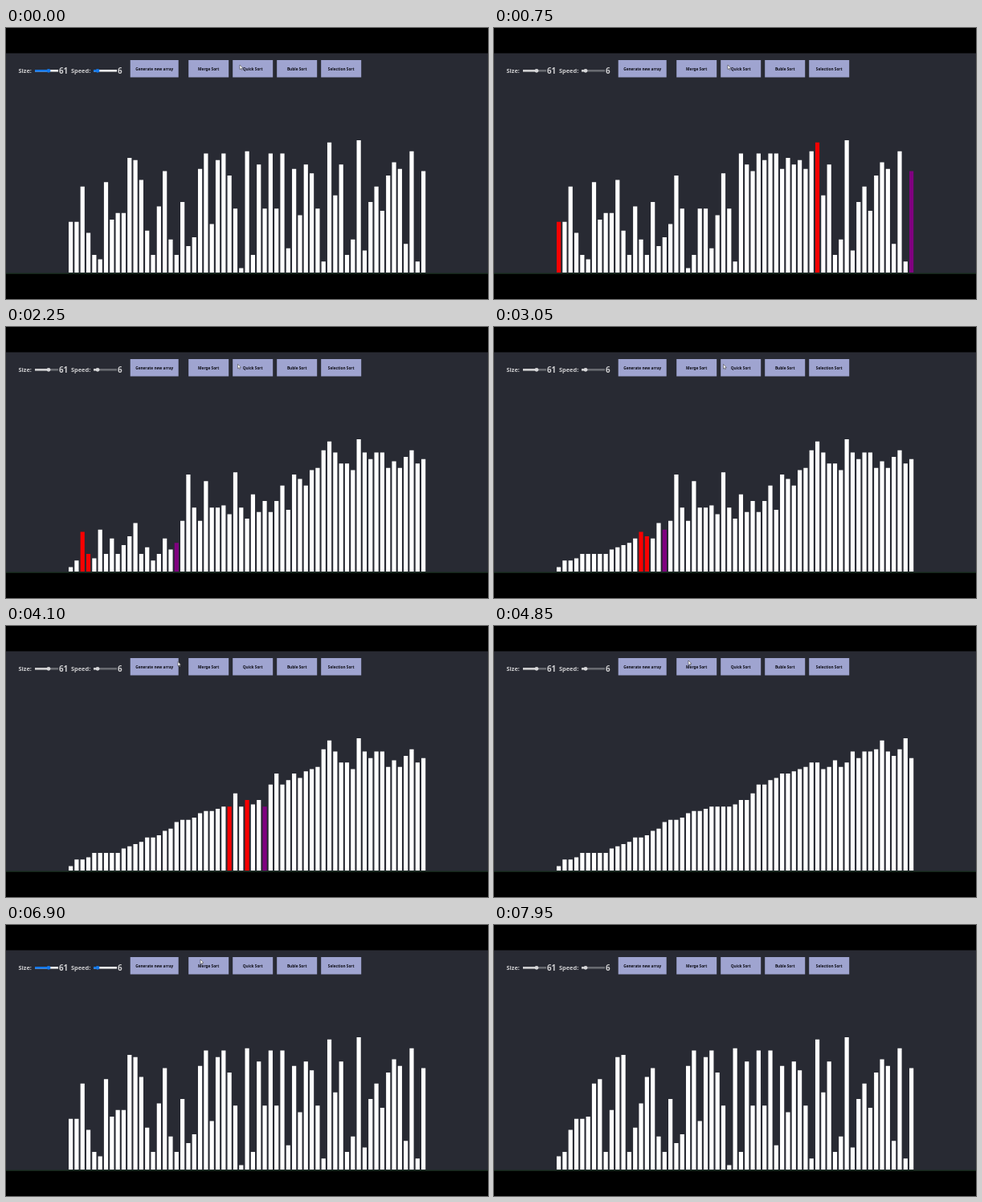
Animation of 600 by 338 pixels, one loop 8 s. Source, as an HTML page with a canvas:

```html
<!DOCTYPE html>
<html lang="en">
<head>
<meta charset="utf-8">
<title>Sorting visualizer</title>
<style>
  html, body { margin: 0; width: 100%; height: 100%; overflow: hidden; background: #000; }
  canvas { display: block; }
</style>
</head>
<body>
<canvas id="stage" width="600" height="338"></canvas>
<script>
const ctx = document.getElementById('stage').getContext('2d');
const LOOP = 8000, TICK = 50;
const SWEEP = 5490, SWEEP_STEP = 16, RESET = 6650, MERGE = 7130, MERGE_STEP = 20;
const WHITE = '#fff', RED = '#f80000', PURPLE = '#800080', GREEN = '#0a900a';
const FONT = '"Noto Sans", "Open Sans", sans-serif';

const values = [
  23, 23, 39, 18, 8, 6, 41, 24, 27, 27, 52, 51, 42, 19, 8, 30, 46, 15, 8, 32,
  12, 16, 47, 54, 22, 51, 54, 44, 29, 2, 55, 8, 49, 29, 54, 29, 54, 11, 47, 26,
  49, 45, 29, 5, 59, 35, 49, 8, 15, 60, 10, 32, 39, 28, 44, 50, 47, 13, 55, 5, 46
];
const last = values.length - 1;
const sorted = [...values].sort((a, b) => a - b);

// One state per comparison, plus an unmarked one before each pivot swap.
function quickStates() {
  const a = [...values], states = [];
  const swap = (i, j) => { [a[i], a[j]] = [a[j], a[i]]; };
  const sort = (lo, hi) => {
    if (lo >= hi) return;
    let p = lo;
    for (let j = lo; j < hi; j++) {
      states.push({ bars: [...a], lo, j, hi });
      if (a[j] < a[hi]) swap(p++, j);
    }
    states.push({ bars: [...a] });
    swap(p, hi);
    sort(lo, p - 1);
    sort(p + 1, hi);
  };
  sort(0, last);
  states.push({ bars: [...a] });
  return states;
}

// One state per value written back.
function mergeStates() {
  const a = [...values], states = [{ bars: [...a] }];
  const sort = (lo, hi) => {
    if (lo >= hi) return;
    const mid = (lo + hi) >> 1;
    sort(lo, mid);
    sort(mid + 1, hi);
    const left = a.slice(lo, mid + 1), right = a.slice(mid + 1, hi + 1);
    for (let k = lo; k <= hi; k++) {
      const useLeft = left.length && (!right.length || left[0] <= right[0]);
      a[k] = (useLeft ? left : right).shift();
      states.push({ bars: [...a] });
    }
  };
  sort(0, last);
  return states;
}

const quick = quickStates(), merge = mergeStates();

// Keys are [time, ...values], interpolated linearly.
function along(keys, t) {
  if (t <= keys[0][0]) return keys[0].slice(1);
  for (let i = 1; i < keys.length; i++) {
    const [a, b] = [keys[i - 1], keys[i]];
    if (t <= b[0]) {
      const k = (t - a[0]) / (b[0] - a[0]);
      return a.slice(1).map((v, n) => v + (b[n + 1] - v) * k);
    }
  }
  return keys[keys.length - 1].slice(1);
}

const pace = [
  [50, 0.5], [1550, 95.5], [3050, 195.5], [4100, 258.5], [4850, 312.5],
  [SWEEP - 30, quick.length - 0.5]
];
const pointer = [
  [1750, 291, 46], [2550, 287, 46.5], [3050, 285.5, 46.5], [3450, 285.5, 46.5],
  [4100, 214, 44.5], [4300, 216, 44.5], [4700, 242, 43]
];

function sceneAt(t) {
  if (t < 50) return { bars: values };
  if (t < SWEEP) return quick[Math.floor(along(pace, t)[0])];
  if (t < RESET) {
    return { bars: sorted, done: Math.floor((t - SWEEP) / SWEEP_STEP) + 1 };
  }
  const n = Math.max(0, Math.floor((t - MERGE) / MERGE_STEP));
  return merge[Math.min(n, merge.length - 1)];
}

function rect(x, y, w, h, color) {
  ctx.fillStyle = color;
  ctx.fillRect(x, y, w, h);
}

function text(str, x, y, size, color, align = 'left') {
  ctx.font = `bold ${size}px ${FONT}`;
  ctx.textAlign = align;
  ctx.fillStyle = color;
  ctx.fillText(str, x, y);
}

function slider(x, knob, active) {
  rect(x, 52, 29, 2.6, active ? '#efefef' : '#686a70');
  rect(x, 52, knob - x, 2.6, active ? '#1478ea' : '#cdcdcf');
  ctx.fillStyle = active ? '#1478ea' : '#d6d6d8';
  ctx.beginPath();
  ctx.arc(knob, 53.3, 2.4, 0, Math.PI * 2);
  ctx.fill();
}

function button(label, x, w) {
  rect(x, 40, w, 21.5, '#9fa4d0');
  text(label, x + w / 2, 52.6, 4.75, '#0c0c14', 'center');
}

function drawPointer(x, y) {
  ctx.beginPath();
  [[0, 0], [0, 5.6], [1.3, 4.5], [2.2, 6.3], [3, 5.9], [2.2, 4.1], [3.9, 4]]
    .forEach(([dx, dy]) => ctx.lineTo(x + dx, y + dy));
  ctx.closePath();
  ctx.fillStyle = '#fff';
  ctx.fill();
  ctx.strokeStyle = '#333';
  ctx.lineWidth = 0.5;
  ctx.stroke();
}

function barColor(i, scene) {
  if (i < scene.done) return GREEN;
  if (i === scene.hi) return PURPLE;
  return i === scene.lo || i === scene.j ? RED : WHITE;
}

function draw(t) {
  rect(0, 0, 600, 338, '#000');
  rect(0, 31.5, 600, 275, '#282a33');
  rect(0, 305.6, 600, 1, '#14301a');

  const active = t < 50 || (t >= RESET && t < MERGE);
  const ink = '#cfcfd1';
  text('Size:', 15.5, 56.2, 7.4, ink);
  slider(36, 53, active);
  text('61', 66, 57.4, 9.8, ink);
  text('Speed:', 81, 56.2, 7.4, ink);
  slider(109, 114, active);
  text('6', 139, 57.4, 9.8, ink);

  button('Generate new array', 154.7, 60);
  ['Merge Sort', 'Quick Sort', 'Buble Sort', 'Selection Sort']
    .forEach((label, i) => button(label, 227.2 + i * 55, 50));

  const scene = sceneAt(t);
  scene.bars.forEach((v, i) =>
    rect(78 + i * 7.317, 305 - v * 2.75, 5.2, v * 2.75, barColor(i, scene)));

  if (t < MERGE) drawPointer(...along(pointer, t));
}

function frame(now) {
  draw(Math.floor((now % LOOP) / TICK) * TICK);
  requestAnimationFrame(frame);
}
draw(0);
requestAnimationFrame(frame);
</script>
</body>
</html>
```
